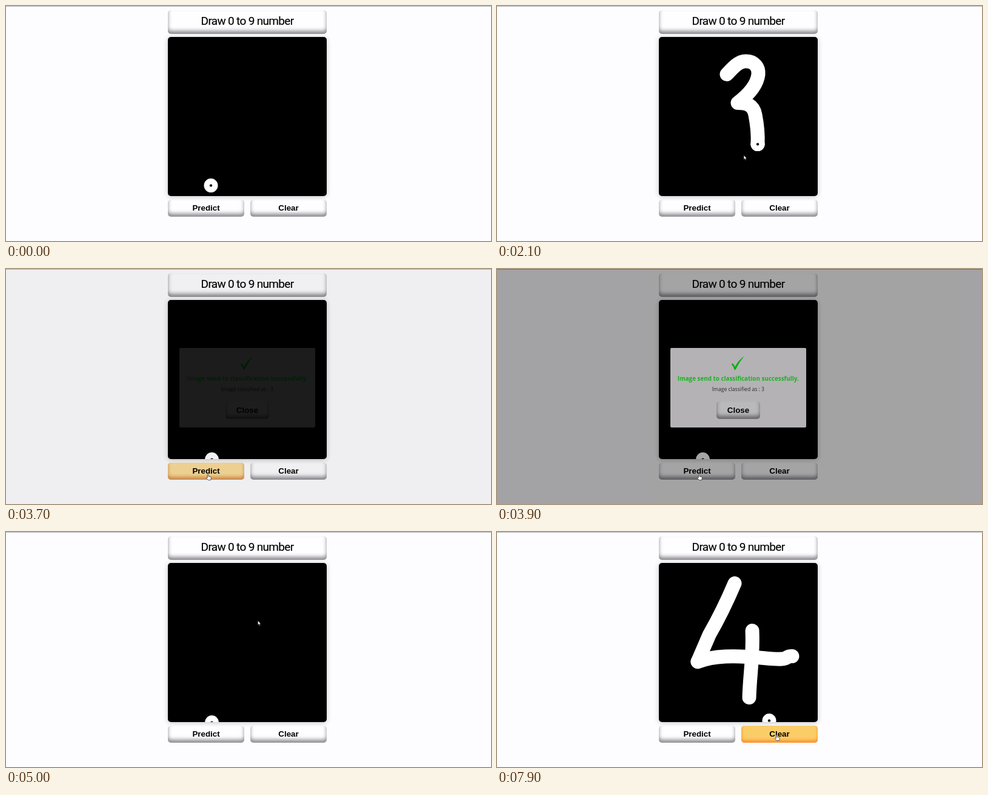
These frames come from a looping animation (800 by 387 pixels, 8000 ms). An HTML page:

```html
<!DOCTYPE html>
<html lang="en">
<head>
<meta charset="utf-8">
<title>Draw a digit</title>
<style>
html, body { margin: 0; width: 100%; height: 100%; overflow: hidden; background: #fdfcfe; }
#stage { position: absolute; left: 0; top: 0; width: 800px; height: 387px; overflow: hidden; }
#stage div, #stage svg { position: absolute; }
.rule { left: 0; top: 0; width: 800px; height: 1px; background: #b2b1b3; }
.panel { border-radius: 5px; background: #fefdff; text-align: center; color: #000; }
.panel, .btn::before { box-shadow: inset 0 -5px 6px rgba(84, 82, 88, .66); }
.head { left: 267px; top: 7px; width: 262px; height: 39px;
  font: 19px/36px Roboto, sans-serif; letter-spacing: -.68px; -webkit-text-stroke: .15px #000; }
.btn { height: 28px; font: bold 13.33px/28px "Liberation Sans", Arial, sans-serif; }
.btn::before { content: ""; position: absolute; inset: 0; border-radius: 5px; opacity: var(--hover, 0);
  background: #fbcd68; box-shadow: inset 0 -4px 5px rgba(255, 112, 10, .66); }
.btn span { position: relative; }
#predict, #clear { top: 319px; width: 126px; }
#predict { left: 267px; }
#clear { left: 403px; }
#pad { left: 267px; top: 51.4px; width: 262px; height: 261.8px; border-radius: 5px;
  background: #000; box-shadow: 0 1px 9px rgba(0, 0, 0, .24); }
#ink { fill: none; stroke: #fff; stroke-width: 23px; stroke-linecap: round; stroke-linejoin: round; }
#veil { inset: 0; background: rgba(0, 0, 0, .485); }
.modal { left: 285.6px; top: 129.6px; width: 224.4px; height: 131.6px; border-radius: 2px; background: #f7f5f8; }
.modal .line { left: 0; width: 100%; text-align: center; white-space: nowrap; }
.title { top: 43.4px; color: #25f52f; font: bold 9.85px/14px "Open Sans", "Noto Sans", sans-serif; }
.result { top: 61.4px; color: #3c3a3d; font: 8.6px/14px "Open Sans", "Noto Sans", sans-serif; }
#close { left: 76.4px; top: 88.4px; width: 72px; height: 29px; line-height: 29px; }
#pointer { left: 0; top: 0; overflow: visible; }
</style>
</head>
<body>
<div id="stage">
  <div class="rule"></div>
  <div class="panel head">Draw 0 to 9 number</div>
  <svg id="pad" viewBox="267 51.4 262 261.8">
    <g id="ink"></g>
    <g id="brush"><circle r="11.5" fill="#fff"/><circle r="2.2"/></g>
  </svg>
  <div class="panel btn" id="predict"><span>Predict</span></div>
  <div class="panel btn" id="clear"><span>Clear</span></div>
  <div id="veil">
    <div class="modal">
      <svg width="224" height="40"><path d="M100.5 27 L102.5 25.3 Q105 27 106.5 31 Q112 20 122 13.5 Q113 24 107.5 36 L105.5 36 Q104 30 100.5 27Z" fill="#0ff01c"/></svg>
      <div class="line title">Image send to classification successfully.</div>
      <div class="line result">Image classified as : 3</div>
      <div class="panel btn" id="close"><span>Close</span></div>
    </div>
  </div>
  <svg id="pointer" width="12" height="14" fill="#fff" stroke="#222" stroke-width=".7" stroke-linejoin="round">
    <path id="arrow" d="M0 0 V7 L1.7 5.6 L2.8 8.2 L4 7.7 L2.9 5.2 H5Z"/>
    <path id="hand" d="M-.7 .5 Q.2 -.6 1 .5 V3.6 L4.6 4.4 Q5.6 4.8 5.4 6 L4.6 9.6 H.3 L-2.6 6.3 Q-2.6 5 -1.5 5.4 L-.7 6Z"/>
  </svg>
</div>
<script>
const LOOP = 8000, STEP = 100, LEAD = 70;
const WIPE = 3500, OPEN = 3600, CLOSE = 4900;
const $ = id => document.getElementById(id);

const linear = p => p;
const swing = p => .5 - Math.cos(p * Math.PI) / 2;
const ramp = (t, start, length) => Math.min(1, Math.max(0, (t - start) / length));

function move(start, end, d, ease = swing) {
  const path = document.createElementNS("http://www.w3.org/2000/svg", "path");
  path.setAttribute("d", d);
  const length = path.getTotalLength();
  const travelled = t => length * ease(ramp(t, start, end - start));
  return { start, path, travelled, at: t => path.getPointAtLength(travelled(t)) };
}

function stroke(start, end, d, ease = linear) {
  const part = move(start, end, d, ease);
  part.inked = true;
  $("ink").append(part.path);
  return part;
}

const brushMoves = [
  move(200, 900, "M338 296 L361 121"),
  move(1000, 1200, "M361 121 L379 113"),
  // the 3, then its quick tail
  stroke(1200, 2100, "M379 113 C390 101 399 91 411 91.5 C425 92 432 101 431 113 C429 130 414 147 397 160 C412 160 423 163 426 180 Q431 205 430 228"),
  stroke(2100, 2300, "M430 228 C429 238 423 241 416 243 S345 268 332 232", swing),
  move(2420, 2900, "M332 232 L339.5 314"),
  move(5150, 5400, "M439 95 L392 85"),
  // the 4: stem, base, bar
  stroke(5400, 5900, "M392 85 Q372 132 350 170 L331 214"),
  stroke(5900, 6400, "M331 214 C358 204 390 203 440 208 S470 205 487 205"),
  move(6450, 6750, "M487 205 L421 163"),
  stroke(6750, 7100, "M421 163 C423 205 417 235 416 273"),
  move(7400, 7700, "M416 273 L449 311")
];
// The pointer leaves the brush only to reach the buttons.
const pointerMoves = [
  move(2420, 3000, "M332 232 L333 338"),
  move(4000, 4600, "M333 338 L410 234"),
  move(4800, 5150, "M410 234 L414 149 L439 95"),
  move(7400, 7800, "M416 273 L461 334")
];

const current = (moves, t) => moves.filter(m => m.start <= t).pop();
const brushMove = t => current(brushMoves, t) || brushMoves[0];

function pointerAt(t) {
  const lead = brushMove(t + LEAD), own = current(pointerMoves, t);
  return own && own.start >= lead.start ? own.at(t) : lead.at(t + LEAD);
}

function drawPad(t) {
  for (const part of brushMoves.filter(m => m.inked)) {
    const shown = t >= part.start && (t < WIPE || part.start > WIPE);
    part.path.style.display = shown ? "" : "none";
    part.path.style.strokeDasharray = `${part.travelled(t)} 999`;
  }
  const { x, y } = brushMove(t).at(t);
  $("brush").setAttribute("transform", `translate(${x} ${y})`);
}

function drawPointer(t) {
  const { x, y } = pointerAt(t), brush = brushMove(t).at(t);
  const hand = y > 318 || t >= 4500 && t < CLOSE;
  $("pointer").style.transform = `translate(${x}px, ${y}px)`;
  $("pointer").style.display = Math.hypot(x - brush.x, y - brush.y) < 9 ? "none" : "";
  $("hand").style.display = hand ? "" : "none";
  $("arrow").style.display = hand ? "none" : "";
}

function hover(id, t, on, off = LOOP) {
  $(id).style.setProperty("--hover", ramp(t, on, 300) - ramp(t, off, 300));
}

function render(t) {
  drawPad(t);
  drawPointer(t);
  hover("predict", t, 2700, OPEN);
  hover("close", t, 4400);
  hover("clear", t, 7500);
  $("veil").style.opacity = t < CLOSE ? swing(ramp(t, OPEN, 460)) : 0;
}

const begin = performance.now();
function tick() {
  const t = (performance.now() - begin) % LOOP;
  render(Math.floor(t / STEP) * STEP);
  requestAnimationFrame(tick);
}
tick();
</script>
</body>
</html>
```
